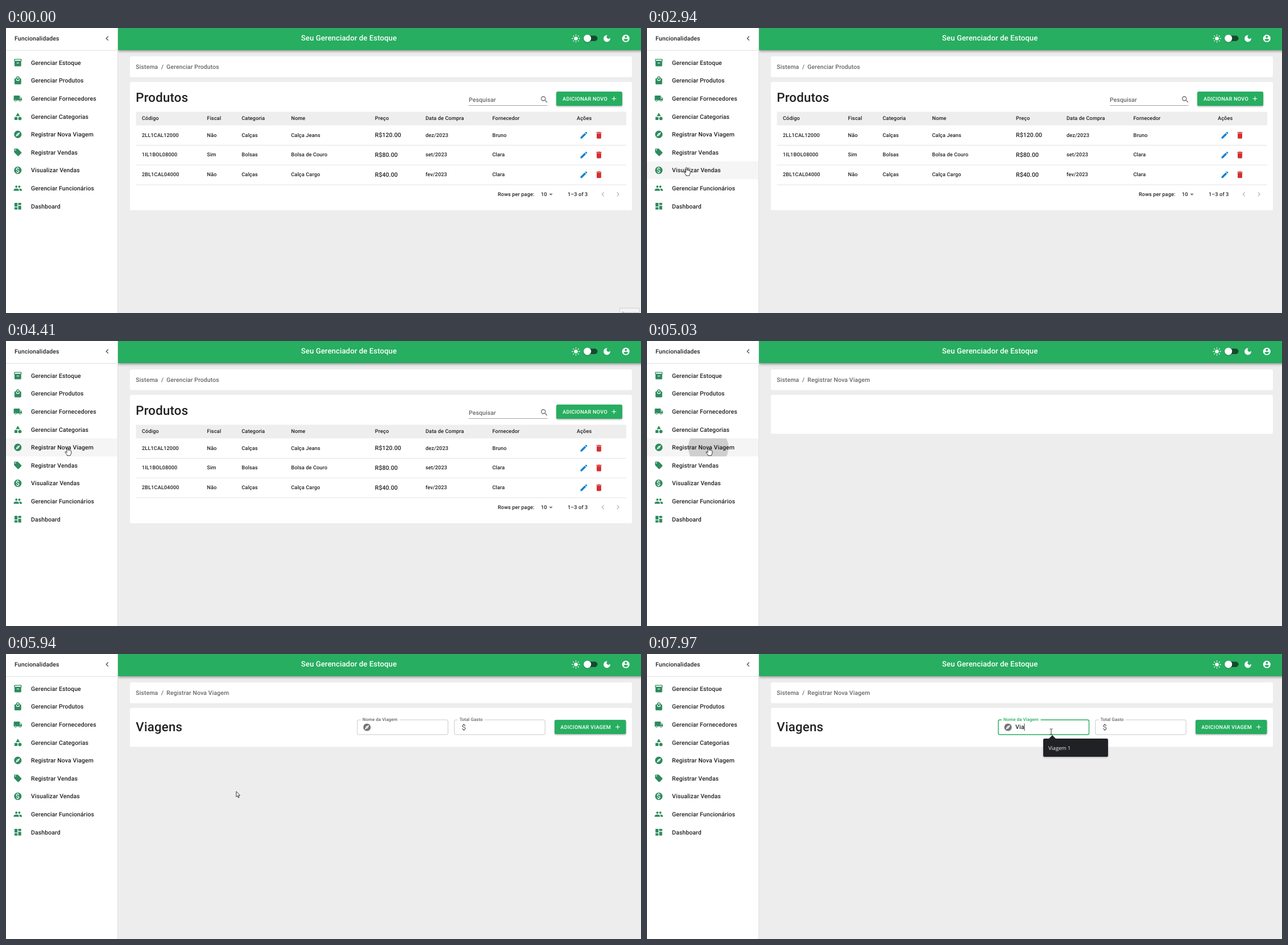
Recreate the animation shown at these times as an HTML page with a canvas. Size 1117x502 px, loop 8 s.

```html
<!DOCTYPE html>
<html lang="pt-BR">
<head>
<meta charset="utf-8">
<title>Gerenciador de Estoque</title>
<style>
html, body { margin: 0; width: 100%; height: 100%; overflow: hidden; background: #ededed; }
canvas { display: block; width: 1117px; height: 502px; }
</style>
</head>
<body>
<canvas id="stage"></canvas>
<script>
const W = 1117, H = 502, LOOP = 8000;
const K = 0.657; // page zoom
const GREEN = '#27ae60', INK = 'rgba(0,0,0,.87)', SOFT = 'rgba(0,0,0,.6)', LINE = '#e0e0e0';
const canvas = document.getElementById('stage');
const ctx = canvas.getContext('2d');
const dpr = window.devicePixelRatio || 1;
canvas.width = W * dpr;
canvas.height = H * dpr;

// Icons on a 24 unit grid
const disc = (x, y, r) =>
  `M${x - r} ${y}a${r} ${r} 0 1 0 ${2 * r} 0a${r} ${r} 0 1 0 ${-2 * r} 0z`;
const rect = (x, y, w, h) => `M${x} ${y}h${w}v${h}h${-w}z`;
const shape = d => new Path2D(d);

const icons = {
  box: shape('M4 2H20Q22 2 22 4V7Q22 8.2 21 8.7V20Q21 22 19 22H5Q3 22 3 20V8.7Q2 8.2 2 7V4Q2 2 4 2z' +
    rect(4, 4, 16, 3) + rect(9, 12, 6, 2)),
  bag: shape('M19 6H17A5 5 0 0 0 7 6H5Q3 6 3 8V20Q3 22 5 22H19Q21 22 21 20V8Q21 6 19 6z' +
    'M12 3A3 3 0 0 1 15 6H9A3 3 0 0 1 12 3zM12 13A5 5 0 0 1 7 8H9A3 3 0 0 0 15 8H17A5 5 0 0 1 12 13z'),
  truck: shape('M20 8H17V4H3Q1 4 1 6V17H3A3 3 0 0 0 9 17H15A3 3 0 0 0 21 17H23V12z' +
    'M19.5 9.5L21.5 12H17V9.5z' + disc(6, 17, 1.5) + disc(18, 17, 1.5)),
  shapes: shape('M12 2L6.5 11H17.5z' + disc(17.5, 17.5, 4.5) + rect(3, 13.5, 8, 8)),
  compass: shape(disc(12, 12, 10) + 'M14.2 14.2L6 18L9.8 9.8L18 6z' + disc(12, 12, 1.1)),
  tag: shape('M21.4 11.6L12.4 2.6Q11.8 2 11 2H4Q2 2 2 4V11Q2 11.8 2.6 12.4L11.6 21.4' +
    'Q13 22.6 14.4 21.4L21.4 14.4Q22.6 13 21.4 11.6z' + disc(5.5, 5.5, 1.5)),
  money: shape('M11.8 10.9c-2.3-.6-3-1.2-3-2.15 0-1.1 1-1.85 2.7-1.85 1.8 0 2.45.85 2.5 2.1h2.2' +
    'c-.07-1.7-1.1-3.3-3.2-3.8V3h-3v2.16c-1.94.42-3.5 1.68-3.5 3.6 0 2.3 1.9 3.46 4.7 4.13' +
    ' 2.5.6 3 1.5 3 2.4 0 .7-.5 1.8-2.7 1.8-2.06 0-2.87-.92-2.98-2.1h-2.2c.12 2.2 1.76 3.4 3.68 3.83' +
    'V21h3v-2.15c1.95-.37 3.5-1.5 3.5-3.55 0-2.84-2.43-3.8-4.7-4.4z'),
  coin: shape(disc(12, 12, 10)),
  people: shape(disc(16, 8, 3) + disc(8, 8, 3) + 'M8 13Q1 13.4 1 16.5V19H15V16.5Q15 13.4 8 13z' +
    'M16 13L15 13.1Q17 14.5 17 16.5V19H23V16.5Q23 13.4 16 13z'),
  board: shape(rect(3, 3, 8, 10) + rect(3, 15, 8, 6) + rect(13, 11, 8, 10) + rect(13, 3, 8, 6)),
  left: shape('M15.4 7.4L14 6L8 12L14 18L15.4 16.6L10.8 12z'),
  right: shape('M10 6L8.6 7.4L13.2 12L8.6 16.6L10 18L16 12z'),
  edit: shape('M3 17.25V21H6.75L17.8 9.94L14.06 6.2zM20.7 7.04Q21.4 6.3 20.7 5.63L18.4 3.3' +
    'Q17.7 2.6 17 3.3L15.1 5.1L18.9 8.9z'),
  trash: shape('M6 7V19Q6 21 8 21H16Q18 21 18 19V7zM19 4H15.5L14.5 3H9.5L8.5 4H5V6H19z'),
  search: shape(disc(9.5, 9.5, 6.5) + disc(9.5, 9.5, 4.5) + 'M14.4 13.7L15.5 14L20.5 19L19 20.5L14 15.5L13.7 14.4z'),
  plus: shape('M19 13H13V19H11V13H5V11H11V5H13V11H19z'),
  moon: shape('M12 3A9 9 0 1 0 21 12L20.9 10.6A5.4 5.4 0 1 1 13.4 3.1z'),
  user: shape(disc(12, 12, 10) + disc(12, 8, 3) + 'M12 19.2Q8.2 19.2 6 16Q6.4 13.1 12 12.9Q17.6 13.1 18 16Q15.8 19.2 12 19.2z'),
  drop: shape('M7 10L12 15L17 10z')
};
icons.coin.addPath(icons.money, new DOMMatrix([0.89, 0, 0, 0.89, 1.3, 1.3]));

const menu = [
  ['box', 'Gerenciar Estoque'], ['bag', 'Gerenciar Produtos'], ['truck', 'Gerenciar Fornecedores'],
  ['shapes', 'Gerenciar Categorias'], ['compass', 'Registrar Nova Viagem'], ['tag', 'Registrar Vendas'],
  ['coin', 'Visualizar Vendas'], ['people', 'Gerenciar Funcionários'], ['board', 'Dashboard']
];
const columns = [239, 353.5, 414.5, 501.5, 649, 738, 855.5, 1004];
const header = ['Código', 'Fiscal', 'Categoria', 'Nome', 'Preço', 'Data de Compra', 'Fornecedor', 'Ações'];
const products = [
  ['2LL1CAL12000', 'Não', 'Calças', 'Calça Jeans', 'R$120.00', 'dez/2023', 'Bruno'],
  ['1IL1BOL08000', 'Sim', 'Bolsas', 'Bolsa de Couro', 'R$80.00', 'set/2023', 'Clara'],
  ['2BL1CAL04000', 'Não', 'Calças', 'Calça Cargo', 'R$40.00', 'fev/2023', 'Clara']
];

// Pointer moves: start, end, x, y, curve
const moves = [
  [280, 420, 553, 377, 0.8], [670, 860, 545, 375, 1], [1330, 2120, 80, 299, 3],
  [2150, 2660, 69, 246, 1], [2900, 3700, 98, 153.5, 1], [3710, 4410, 108, 187, 1],
  [5600, 5690, 411, 244, 2.5], [5900, 5940, 405, 242, 1], [5950, 6720, 711, 137, 1]
];

const clamp = v => Math.max(0, Math.min(1, v));
const span = (t, a, b) => clamp((t - a) / (b - a));
const smooth = p => p * p * (3 - 2 * p);
const mix = (a, b, p) => a + (b - a) * p;

function pointer(t) {
  let x = 983, y = 484;
  for (const [a, b, tx, ty, k] of moves) {
    if (t < a) break;
    const p = Math.pow(smooth(span(t, a, b)), k);
    x = mix(x, tx, p);
    y = mix(y, ty, p);
  }
  return { x, y };
}

function text(str, x, cy, size = 16, color = INK, spacing = size === 14 ? 0.0107 : 0.0094) {
  const px = size * K;
  ctx.font = `500 ${px}px Roboto, Arial, sans-serif`;
  ctx.letterSpacing = `${spacing * px}px`;
  ctx.fillStyle = color;
  ctx.fillText(str, x, cy + px * 0.355);
  return ctx.measureText(str).width;
}

function icon(name, cx, cy, color, size = 24) {
  const s = size * K / 24;
  ctx.save();
  ctx.translate(cx - 12 * s, cy - 12 * s);
  ctx.scale(s, s);
  ctx.fillStyle = color;
  ctx.fill(icons[name], 'evenodd');
  ctx.restore();
}

function bar(x, y, w, h, color) {
  ctx.fillStyle = color;
  ctx.fillRect(x, y, w, h);
}

function panel(x, y, w, h, color, r = 2.6) {
  ctx.fillStyle = color;
  ctx.beginPath();
  ctx.roundRect(x, y, w, h, r);
  ctx.fill();
}

function shadowed(blur, dy, alpha, draw) {
  ctx.save();
  ctx.shadowColor = `rgba(0,0,0,${alpha})`;
  ctx.shadowBlur = blur * dpr;
  ctx.shadowOffsetY = dy * dpr;
  draw();
  ctx.restore();
}

function button(label, x, y, w, h, textX, plusX) {
  shadowed(3, 1.3, 0.35, () => panel(x, y, w, h, GREEN));
  text(label, textX, y + h / 2, 14, '#fff', 0.0286);
  icon('plus', plusX, y + h / 2, '#fff', 20);
}

function topBar() {
  shadowed(5, 1.8, 0.45, () => bar(197, 0, W, 39, GREEN));
  text('Seu Gerenciador de Estoque', 519, 17.5, 20, '#fff', 0.0075);
  ctx.strokeStyle = '#fff';
  ctx.lineWidth = 1.3;
  ctx.lineCap = 'round';
  ctx.beginPath();
  for (let i = 0; i < 8; i++) {
    const c = Math.cos(i * Math.PI / 4), s = Math.sin(i * Math.PI / 4);
    ctx.moveTo(1002.5 + c * 5.5, 18.5 + s * 5.5);
    ctx.lineTo(1002.5 + c * 6.6, 18.5 + s * 6.6);
  }
  ctx.stroke();
  ctx.lineCap = 'butt';
  panel(999.2, 15.2, 6.6, 6.6, '#fff', 3.3);
  panel(1018, 13.5, 22.5, 9.4, '#17492f', 4.7);
  shadowed(2, 0.8, 0.35, () => panel(1016.2, 11.7, 13, 13, '#fff', 6.5));
  icon('moon', 1057, 18.5, '#fff');
  icon('user', 1090.3, 18.3, '#fff');
}

function ripple(t, top) {
  const grow = smooth(span(t, 4835, 5385));
  const alpha = mix(0.1, 0.3, grow) * (1 - smooth(span(t, 5060, 5640)));
  if (t < 4860 || alpha <= 0) return;
  ctx.save();
  ctx.beginPath();
  ctx.rect(0, top, 196, 31.6);
  ctx.clip();
  ctx.beginPath();
  ctx.arc(108, 187.5, 122 * grow, 0, 7);
  ctx.fillStyle = `rgba(0,0,0,${alpha})`;
  ctx.fill();
  ctx.restore();
}

function sideBar(t, hover) {
  bar(0, 0, 196, H, '#fff');
  bar(196, 0, 1, H, LINE);
  bar(0, 39, 196, 1, LINE);
  text('Funcionalidades', 15, 18);
  icon('left', 178, 18.3, 'rgba(0,0,0,.7)');
  menu.forEach(([name, label], i) => {
    const cy = 61 + i * 31.6, top = cy - 15.8;
    if (i === hover) bar(0, top, 196, 31.6, '#f5f5f5');
    if (i === 4) ripple(t, top);
    icon(name, 20.8, cy, '#2e8b5e');
    text(label, 44, cy);
  });
}

function breadcrumb(page) {
  panel(218, 50, 883, 36.5, '#fff');
  text('Sistema', 228.3, 68, 16, SOFT);
  text('/', 273, 68, 16, SOFT);
  text(page, 282.3, 68, 16, SOFT);
}

function productsPage() {
  breadcrumb('Gerenciar Produtos');
  panel(218, 95, 883, 226, '#fff');
  text('Produtos', 228.3, 122.3, 34, INK, 0.00735);
  text('Pesquisar', 814, 125.8, 16, SOFT);
  bar(814, 136, 138.5, 0.8, 'rgba(0,0,0,.45)');
  icon('search', 946.8, 126, 'rgba(0,0,0,.56)');
  button('ADICIONAR NOVO', 968, 112, 116, 25, 979, 1069.5);
  bar(228.5, 147.5, 862.5, 24, '#eeeeee');
  header.forEach((label, i) => text(label, columns[i], 159.2, 14));
  products.forEach((row, r) => {
    const cy = 188.3 + r * 34.8;
    row.forEach((cell, i) => text(cell, columns[i], cy, i === 4 ? 16 : 14));
    icon('edit', 1016.5, cy + 0.5, '#0f82d0');
    icon('trash', 1043, cy + 0.5, '#d32f2f');
    bar(228.5, 206 + r * 34.8, 862.5, 0.9, LINE);
  });
  text('Rows per page:', 865, 292.5, 14);
  text('10', 941, 292.5, 14);
  icon('drop', 958.5, 293, 'rgba(0,0,0,.55)');
  text('1–3 of 3', 988, 292.5, 14);
  icon('left', 1050, 292.8, 'rgba(0,0,0,.28)');
  icon('right', 1076.5, 292.8, 'rgba(0,0,0,.28)');
}

function field(x, label, labelWidth, border, lineWidth, labelColor, iconName) {
  ctx.strokeStyle = border;
  ctx.lineWidth = lineWidth;
  ctx.beginPath();
  ctx.roundRect(x, 116, 159.5, 26, 2.6);
  ctx.stroke();
  bar(x + 6, 114.5, labelWidth + 6.5, 3, '#fff');
  text(label, x + 9, 114.8, 12, labelColor);
  icon(iconName, x + 17, 129, 'rgba(0,0,0,.54)');
}

function tripPage(t, over) {
  breadcrumb('Registrar Nova Viagem');
  panel(218, 95, 883, 68.5, '#fff');
  ctx.globalAlpha = smooth(span(t, 5030, 5400));
  if (ctx.globalAlpha > 0) {
    const focus = t >= 6720, tint = span(t, 6720, 6920);
    const idle = 'rgba(0,0,0,.27)';
    const labelColor = `rgba(${mix(0, 39, tint)},${mix(0, 174, tint)},${mix(0, 96, tint)},${mix(0.6, 1, tint)})`;
    text('Viagens', 228.3, 128, 34, INK, 0.00735);
    field(618, 'Nome da Viagem', 62, focus ? GREEN : over ? INK : idle, focus ? 1.4 : 0.8, labelColor, 'compass');
    field(788.7, 'Total Gasto', 41, idle, 0.8, SOFT, 'money');
    button('ADICIONAR VIAGEM', 965, 116, 125.5, 25, 975.3, 1076);
  }
  ctx.globalAlpha = 1;
  if (t >= 6720) typing(t);
}

function typing(t) {
  const typed = 'Via'.slice(0, [7520, 7800, 7970].filter(k => t >= k).length);
  const width = typed ? text(typed, 648, 128.7) : 0;
  if (t >= 6760 && (t < 7270 || t >= 7520)) bar(648 + width, 122.5, 0.9, 12.5, '#222');
  if (t >= 7520 && t < 7560) return;
  ctx.globalAlpha = span(t, 6730, 6930);
  shadowed(3, 1, 0.3, () => panel(697, 149, 114, 32, '#202124'));
  ctx.beginPath();
  ctx.moveTo(706.5, 149.5);
  ctx.lineTo(713, 143);
  ctx.lineTo(719.5, 149.5);
  ctx.fill();
  ctx.font = '9.2px "Open Sans", "Noto Sans", sans-serif';
  ctx.letterSpacing = '0px';
  ctx.fillStyle = '#eee';
  ctx.fillText('Viagem 1', 706, 168.8);
  ctx.globalAlpha = 1;
}

const arrow = shape('M0 0V9.6L2.2 7.7L3.7 11.1L5.2 10.4L3.7 7.1H6.7z');
const hand = shape('M-1 1Q0 -.8 1 1V5.2Q2 4.2 3 5.5Q4 4.8 5 6Q6.6 5.4 6.8 7.3V10Q6.8 12 5.3 13.8V14.8H-.6V13.8' +
  'Q-2.8 11.3 -4 8.8Q-3.6 7.2 -2 8.5L-1 9.6z');
const beam = shape('M-2.5 -5H-.6L0 -4.4L.6 -5H2.5M0 -4.4V4.4M-2.5 5H-.6L0 4.4L.6 5H2.5');

function drawPointer({ x, y }, kind) {
  ctx.save();
  ctx.translate(x, y);
  ctx.lineJoin = 'round';
  ctx.lineWidth = 0.9;
  ctx.strokeStyle = '#222';
  if (kind !== beam) {
    ctx.fillStyle = '#fff';
    ctx.fill(kind);
  }
  ctx.stroke(kind);
  ctx.restore();
}

function cornerTip() {
  ctx.lineWidth = 0.8;
  ctx.strokeStyle = '#c8c8c8';
  bar(1079, 493, 35, 9, '#f4f4f4');
  ctx.strokeRect(1079.5, 493.5, 34.5, 12);
  text('Pesquisa', 1083, 502.5, 11, '#999');
}

function draw(t) {
  const at = pointer(t);
  const inMenu = at.x < 196;
  const hover = inMenu && t >= 280 ? Math.floor((at.y - 45.2) / 31.6) : -1;
  const inField = at.x > 618 && at.x < 777 && at.y > 116 && at.y < 142;

  ctx.setTransform(dpr, 0, 0, dpr, 0, 0);
  ctx.textRendering = 'geometricPrecision';
  bar(0, 0, W, H, '#ededed');
  if (t < 4930) productsPage();
  else tripPage(t, inField);
  topBar();
  sideBar(t, hover);
  if (t < 40) cornerTip();
  if (t >= 280) drawPointer(at, inMenu ? hand : inField ? beam : arrow);
}

const start = performance.now();
function tick() {
  draw((performance.now() - start) % LOOP);
  requestAnimationFrame(tick);
}
tick();
</script>
</body>
</html>
```
